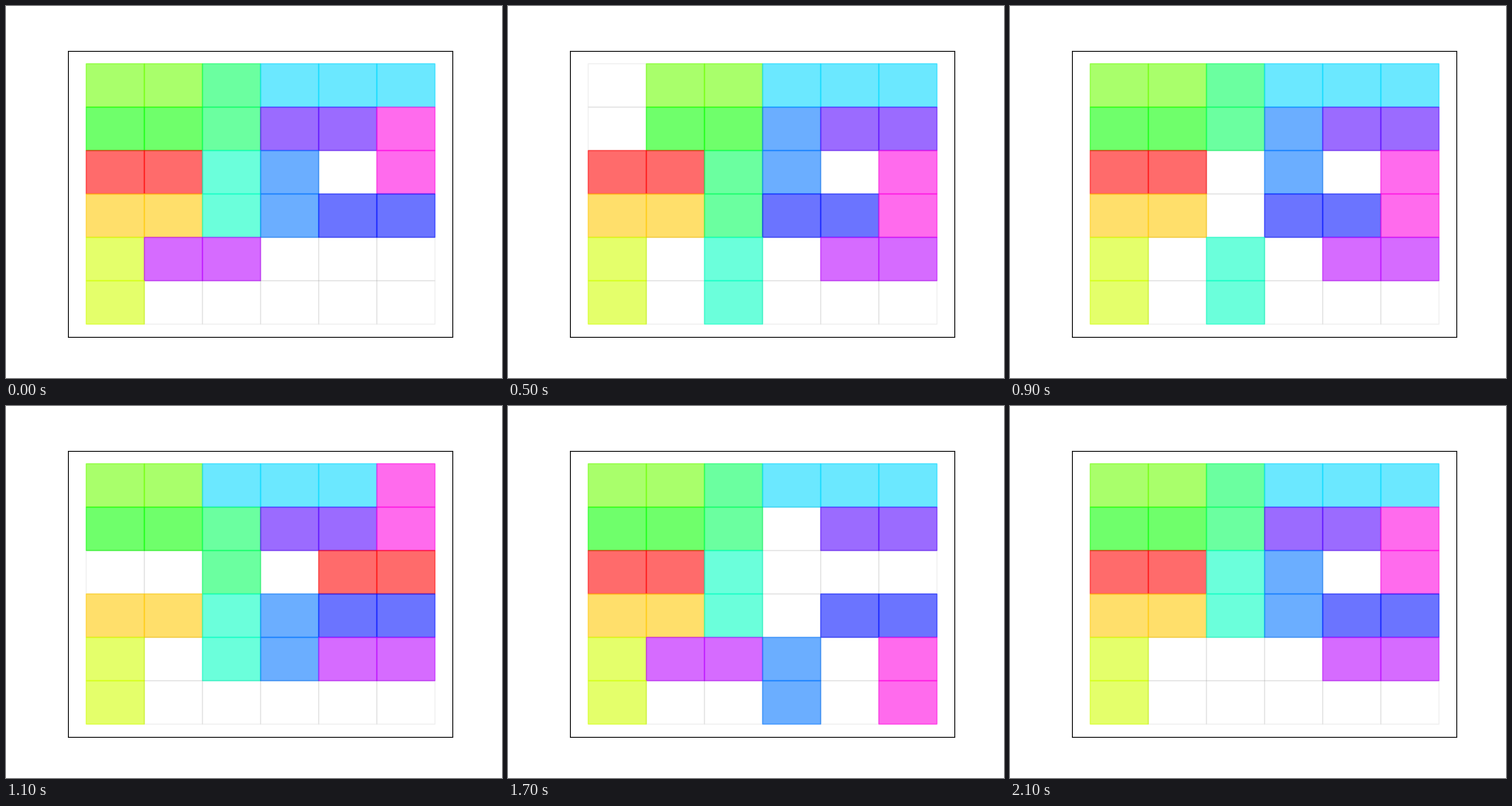
These frames come from a looping animation (640 by 480 pixels, 2200 ms). A matplotlib script:

```python
import matplotlib.pyplot as plt
from matplotlib.animation import FuncAnimation
from matplotlib.patches import Rectangle

SIZE = 6
ALPHA = 0.58
EMPTY_EDGE = (0, 0, 0, 0.06)

# name: (hue step, row, column, length, direction)
CARS = {
    "red": (0, 2, 0, 2, "h"),
    "orange": (2, 3, 0, 2, "h"),
    "yellow": (3, 4, 0, 2, "v"),
    "lime": (4, 0, 1, 2, "h"),
    "green": (5, 1, 1, 2, "h"),
    "spring": (6, 2, 2, 2, "v"),
    "teal": (7, 4, 2, 2, "v"),
    "cyan": (8, 0, 3, 3, "h"),
    "blue": (9, 1, 3, 2, "v"),
    "indigo": (10, 3, 3, 2, "h"),
    "purple": (11, 1, 4, 2, "h"),
    "violet": (12, 4, 4, 2, "h"),
    "magenta": (13, 2, 5, 2, "v"),
}

# The solution: each move slides one car along its own direction
MOVES = [
    ("lime", -1), ("green", -1), ("spring", -2), ("teal", -2),
    ("violet", -3), ("magenta", 2), ("indigo", 1), ("blue", 3),
    ("purple", -1), ("indigo", -1), ("magenta", -3), ("indigo", 1),
    ("blue", -2), ("violet", 3), ("teal", 1), ("blue", 1),
    ("red", 3), ("spring", 1), ("cyan", -1), ("magenta", -1), ("red", 1),
]

# The boards are shown out of sequence
ORDER = [13, 4, 19, 15, 10, 0, 12, 7, 18, 3, 11,
         21, 20, 5, 6, 1, 2, 8, 9, 17, 16, 14]


def board(shift):
    """Map each occupied (row, column) to a hue step."""
    cells = {}
    for name, (hue, row, col, length, way) in CARS.items():
        for k in range(length):
            step = shift[name] + k
            cell = (row, col + step) if way == "h" else (row + step, col)
            cells[cell] = hue
    return cells


def solve():
    shift = dict.fromkeys(CARS, 0)
    boards = [board(shift)]
    for name, step in MOVES:
        shift[name] += step
        boards.append(board(shift))
    return boards


boards = solve()
fig, ax = plt.subplots(figsize=(6.4, 4.8), dpi=100)
ax.set(xticks=[], yticks=[])
ax.set_xlim(-0.05 * SIZE, 1.05 * SIZE)
ax.set_ylim(1.05 * SIZE, -0.05 * SIZE)

tiles = {}
for row in range(SIZE):
    for col in range(SIZE):
        tiles[row, col] = ax.add_patch(Rectangle((col, row), 1, 1, lw=1))


def update(frame):
    cells = boards[ORDER[frame]]
    for cell, tile in tiles.items():
        if cell in cells:
            color = plt.cm.hsv(cells[cell] / 15, alpha=ALPHA)
            tile.set(facecolor=color, edgecolor=color)
        else:
            tile.set(facecolor="none", edgecolor=EMPTY_EDGE)
    return list(tiles.values())


anim = FuncAnimation(fig, update, frames=len(ORDER), interval=100,
                     repeat=True, repeat_delay=0)
plt.show()
```
